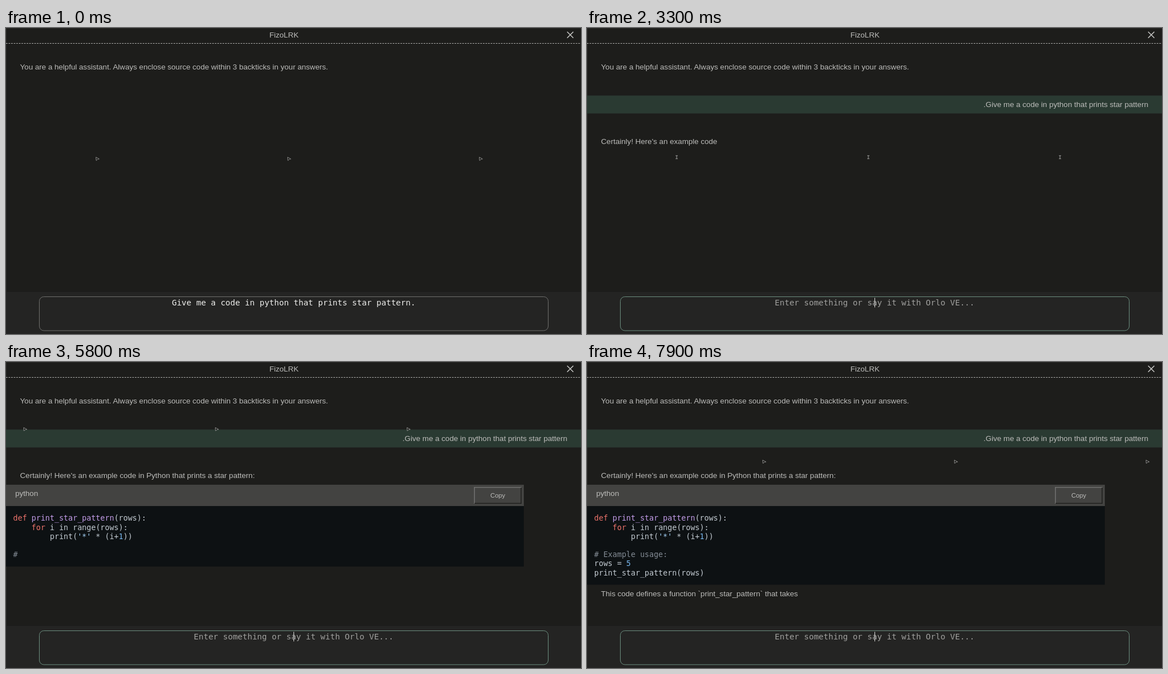
An HTML page that plays this animation: 1026 by 546 pixels, repeating every 8000 ms.

```html
<!DOCTYPE html>
<html lang="en">
<head>
<meta charset="utf-8">
<title>Chat</title>
<style>
  html, body { margin: 0; width: 100%; height: 100%; overflow: hidden; background: #1d1d1b; }
  svg { display: block; width: 100vw; height: 100vh; }
  text { white-space: pre; font: 13.6px "Liberation Sans", Arial, sans-serif; fill: #bcbcba; }
  .mono { font-family: "DejaVu Sans Mono", monospace; }
  .code text { fill: #c3cbd2; }
  .code .keyword { fill: #ec736b; }
  .code .title { fill: #c39de9; }
  .code .number { fill: #79b8f0; }
  .code .string { fill: #a0cef3; }
  .code .comment { fill: #838b94; }
  #entry { font-size: 14.45px; }
</style>
</head>
<body>
<svg viewBox="0 0 1026 546">
  <defs>
    <path id="arrow" d="M-2.5 -3 L3.3 .2 L.3 .9 L-2 3 Z" fill="#141413" stroke="#a9a9a7" stroke-width=".8"/>
    <path id="beam" d="M-2 -2.5 H2 M-2 2.9 H2 M0 -2.5 V2.9" fill="none" stroke="#a9a9a7" stroke-width=".9"/>
  </defs>
  <rect width="1026" height="546" fill="#1d1d1b"/>
  <path d="M.5 0 V546 M0 .5 H1026" stroke="#292927"/>
  <text x="496" y="16.5" text-anchor="middle">FizoLRK</text>
  <path d="M1001.3 6.7 L1012.3 17.7 M1012.3 6.7 L1001.3 17.7" stroke="#c4c4c2" stroke-width="1.6"/>
  <path d="M0 27.5 H1026" stroke="#b4b4b2" stroke-dasharray="2.8 1.8"/>
  <text x="25" y="74.3">You are a helpful assistant. Always enclose source code within 3 backticks in your answers.</text>

  <g id="question">
    <rect y="120.5" width="1026" height="32" fill="#2a3a32"/>
    <text x="1001.5" y="140.5" text-anchor="end">.Give me a code in python that prints star pattern</text>
  </g>
  <text id="intro" x="25" y="207"></text>

  <g id="block">
    <rect y="219" width="924" height="38" fill="#434341"/>
    <text x="16.4" y="239.3">python</text>
    <rect x="835" y="223" width="85" height="30" fill="#434341"/>
    <path d="M835.8 253 V223.8 H920" fill="none" stroke="#71716f" stroke-width="1.6"/>
    <path d="M836 252.2 H919.2 V224" fill="none" stroke="#20201e" stroke-width="1.6"/>
    <text x="877.5" y="242" text-anchor="middle" style="font-size:11.4px">Copy</text>
    <rect id="panel" y="257" width="924" height="27" fill="#0d1113"/>
    <g id="code" class="code"></g>
  </g>
  <text id="outro" x="25" y="417.8"></text>

  <rect y="471" width="1026" height="75" fill="#242423"/>
  <rect id="field" x="59.5" y="479.5" width="908" height="60.5" rx="8" fill="#242423"/>
  <text id="entry" class="mono" x="513.3" y="495.1" text-anchor="middle"></text>
  <path id="caret" d="M0 481.5 V498.5" stroke="#e4e4e2"/>
  <g id="pointers"></g>
</svg>
<script>
const LOOP = 8000, FOCUS = 500, SEND = 2300, BLOCK = 4000, LINE = 16.2;

// Streamed text: [time, chunk]
const intro = [
  [2800, "Certainly"], [2900, "! Here's"], [3000, " an"], [3100, " example"],
  [3300, " code"], [3600, " in Python that prints a"], [3800, " star pattern:"]
];
const source = [
  [4300, "def"], [4500, " print"], [4700, "_star_pattern(rows"], [4800, "):\n    for"],
  [4900, " i in"], [5000, " range("], [5100, "rows):"],
  [5500, "\n        print('*'"], [5600, " * (i+1"], [5800, "))\n\n#"],
  [5900, " Example"], [6000, " usage"], [6100, ":"], [6200, "\nrows"], [6300, " ="],
  [6400, " 5"], [6500, "\nprint"], [6600, "_star"], [6700, "_pattern(rows"], [7000, ")"]
];
const outro = [
  [7000, "This"], [7100, " code"], [7200, " defines"], [7300, " a"], [7400, " function"],
  [7500, " `print_star"], [7700, "_pattern"], [7900, "` that takes"]
];
const blinks = [600, 1200, 1800, 2900, 3100, 3600, 4500, 5100, 5600, 6200, 6600, 7300, 7900];

// Pointer path: [time, x, y, shape]
const track = [
  [0, 163, 233.5, "arrow"], [500, 160, 230.3, "beam"], [5300, 131, 205, "beam"],
  [5500, 34, 120, "arrow"], [5800, 34, 120, "arrow"], [6600, 230, 172.5, "arrow"],
  [7000, 232, 173, "arrow"], [7100, 236, 174, "arrow"], [7500, 312, 176.5, "arrow"],
  [7700, 313, 177, "arrow"], [7900, 316, 178, "arrow"]
];

const $ = id => document.getElementById(id);
const typed = (chunks, t) => chunks.filter(c => c[0] <= t).map(c => c[1]).join("");
const show = (id, on) => $(id).setAttribute("visibility", on ? "visible" : "hidden");

const kinds = ["comment", "string", "keyword", "title", "number"];
const syntax = /(#.*)|('[^']*'?)|(\b(?:def|for)\b)|((?<=def )\w+)|(\b\d+)/g;
const highlight = line => line.replace(syntax, (word, ...groups) =>
  `<tspan class="${kinds[groups.findIndex(g => g !== undefined)]}">${word}</tspan>`);

function drawCode(t) {
  const text = typed(source, t), lines = text ? text.split("\n") : [];
  $("panel").setAttribute("height", 27 + LINE * lines.length);
  $("code").innerHTML = lines.map((line, i) =>
    `<text class="mono" x="12.8" y="${283.4 + i * LINE}">${highlight(line)}</text>`).join("");
}

function drawPointers(t) {
  let i = track.length - 1;
  while (track[i][0] > t) i--;
  const [t0, x0, y0, shape] = track[i];
  const [t1, x1, y1] = track[i + 1] || track[i];
  const gliding = (t0 >= 5800 && t0 < 6600) || (t0 >= 7100 && t0 < 7500);
  const k = gliding ? (t - t0) / (t1 - t0) : 0;
  const x = x0 + (x1 - x0) * k, y = y0 + (y1 - y0) * k;
  $("pointers").innerHTML = [0, 342, 684].map(dx =>
    `<use href="#${shape}" x="${x + dx}" y="${y}"/>`).join("");
}

function draw(t) {
  const sent = t >= SEND;
  show("question", sent);
  show("block", t >= BLOCK);
  $("intro").textContent = typed(intro, t);
  $("outro").textContent = typed(outro, t);
  $("field").setAttribute("stroke", t >= FOCUS ? "#6c8f80" : "#70706e");
  $("entry").textContent = sent ? "Enter something or say it with Orlo VE..."
                                : "Give me a code in python that prints star pattern.";
  $("entry").style.fill = sent ? "#a0a09e" : "#eeeeec";
  $("caret").setAttribute("transform", `translate(${sent ? 513.5 : 730.7})`);
  show("caret", blinks.filter(b => b <= t).length % 2);
  if (t >= BLOCK) drawCode(t);
  drawPointers(t);
}

let last = -1;
function tick() {
  const t = Math.floor(performance.now() % LOOP / 100) * 100;
  if (t !== last) draw(last = t);
  requestAnimationFrame(tick);
}
tick();
</script>
</body>
</html>
```
